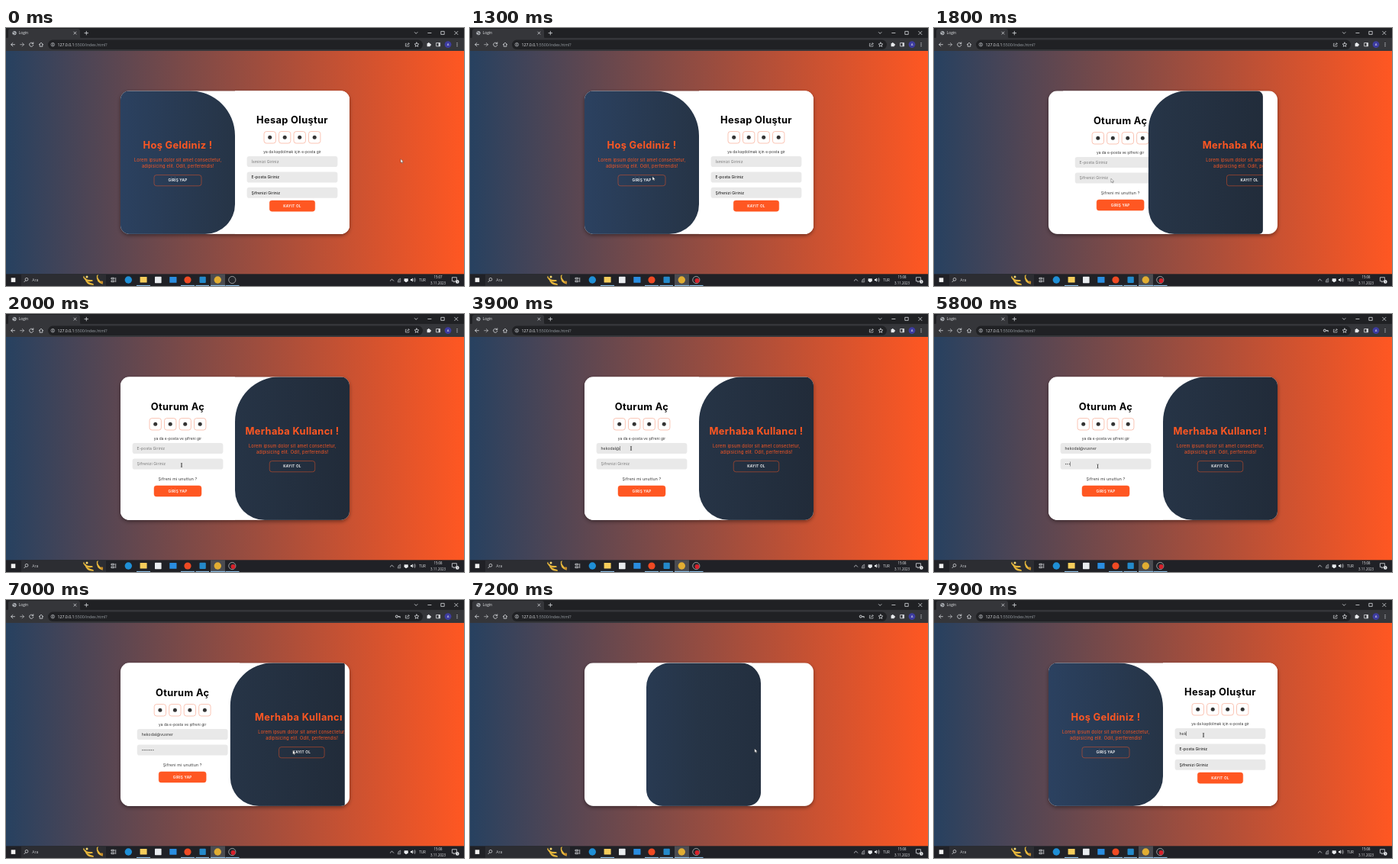
An HTML page for the animation above (8000 ms loop, 600 by 338 pixels).

```html
<!DOCTYPE html>
<html lang="tr">
<head>
<meta charset="utf-8">
<title>Login</title>
<style>
  html, body { margin: 0; width: 100%; height: 100%; overflow: hidden; background: #202124; }
  svg { display: block; width: 100vw; height: 100vh; }
  text { font-family: Inter, sans-serif; }
  .ui { font-family: "Open Sans", "Noto Sans", sans-serif; fill: #e8eaed; }
  .mid { text-anchor: middle; }
  .title { font-size: 12.8px; font-weight: 700; letter-spacing: .36px; }
  .lead { font-size: 5.6px; letter-spacing: .22px; }
  .note { font-size: 4.8px; letter-spacing: .06px; fill: #333; }
  .link { font-size: 5.2px; letter-spacing: .18px; fill: #333; }
  .field { font-size: 5.1px; letter-spacing: .08px; }
  .btn { font-size: 4.7px; font-weight: 600; letter-spacing: .23px; fill: #fff; }
  .line { fill: none; stroke: #dadce0; stroke-width: .8; stroke-linecap: round; stroke-linejoin: round; }
</style>
</head>
<body>
<svg id="stage" viewBox="0 0 600 338" preserveAspectRatio="none"></svg>
<script>
const LOOP = 8000;
const ORANGE = '#ff5722';
const EMAIL = 'hekodal@vusner';
const NAME = 'hek';
const CARD = { x: 150, y: 82.3, w: 300, h: 187.6 };

// Markup helpers
const text = (x, y, cls, str, extra = '') => `<text x="${x}" y="${y}" class="${cls}" ${extra}>${str}</text>`;
const rect = (x, y, w, h, fill, r = 0, extra = '') =>
  `<rect x="${x}" y="${y}" width="${w}" height="${h}" rx="${r}" fill="${fill}" ${extra}/>`;
const dot = (x, y, r, fill, extra = '') => `<circle cx="${x}" cy="${y}" r="${r}" fill="${fill}" ${extra}/>`;
const line = (d, extra = '') => `<path class="line" d="${d}" ${extra}/>`;
const gradient = (id, x1, x2, colors) =>
  `<linearGradient id="${id}" gradientUnits="userSpaceOnUse" x1="${x1}" x2="${x2}">` +
  colors.map((c, i) => `<stop offset="${i / (colors.length - 1)}" stop-color="${c}"/>`).join('') +
  '</linearGradient>';

const button = (cx, y, w, label, filled) =>
  rect(cx - w / 2, y, w, 14.2, filled ? ORANGE : 'none', 3.1, `stroke="${ORANGE}" stroke-width=".45"`) +
  text(cx, y + 8.8, 'btn mid', label);

const socials = (cx, cy) => [-29.3, -9.8, 9.7, 29.2].map(dx =>
  rect(cx + dx - 7.7, cy - 7.7, 15.4, 15.4, '#fff', 3.1, 'stroke="#f58a6a" stroke-width=".5"') +
  dot(cx + dx, cy, 2.5, '#333')).join('');

const input = (id, x, y, hint) =>
  rect(x, y, 118.8, 14, '#e9e9e9', 3.1) +
  text(x + 5.9, y + 8.9, 'field', hint, `id="${id}" data-hint="${hint}"`);

const panel = (id, title, button) =>
  `<g id="${id}" fill="${ORANGE}">` + text(225, 158.3, 'title mid', title) +
  text(225.3, 175, 'lead mid', 'Lorem ipsum dolor sit amet consectetur,') +
  text(225.3, 182.8, 'lead mid', 'adipisicing elit. Odit, perferendis!') + button + '</g>';

function defs() {
  return '<defs>' +
    gradient('page', 0, 600, ['#274160', '#ff5722']) +
    gradient('navy', 150, 450, ['#2b4160', '#263446', '#212b39']) +
    '<filter id="blur" x="-20%" y="-20%" width="140%" height="140%"><feGaussianBlur stdDeviation="2.9"/></filter>' +
    `<clipPath id="cardClip">${rect(CARD.x, CARD.y, CARD.w, CARD.h, '#000', 11.7)}</clipPath>` +
    '<clipPath id="toggleClip"><path id="toggleShape"/></clipPath></defs>';
}

function browserBar() {
  return rect(0, 0, 600, 13.5, '#202124') +
    '<path d="M1 13.5q2 0 2-2V4q0-3 3-3H94q3 0 3 3v7.500q0 2 2 2z" fill="#35363a"/>' +
    rect(0, 13, 600, 17, '#35363a') +
    dot(11, 6.6, 2.6, '#bdc1c6') + line('M9.300 5.600h2l1 1.500M10 8.200l1.500-.6', 'style="stroke:#35363a"') +
    text(16.800, 8.400, 'ui', 'Login', 'font-size="4.8"') +
    line('M88.900 5.100l3 3m0-3l-3 3M103 6.600h4.600m-2.300-2.300v4.600') +
    line('M535.400 5.600l1.800 1.800 1.800-1.800M552.800 6.500h4.200M570.200 4.400h4v4h-4zM587.700 4.400l4.200 4.200m0-4.200l-4.200 4.200') +
    line('M11.500 21.700h-4.800m2.200-2.200l-2.200 2.200 2.200 2.200') +
    line('M18.700 21.700h4.800m-2.200-2.200l2.200 2.200-2.200 2.200', 'opacity=".75"') +
    line('M35.500 20.400a2.600 2.600 0 1 0 .3 2M35.800 18.800v1.900h-1.900') +
    line('M43.300 21.700l2.700-2.500 2.700 2.500m-4.500-.4v2.900h3.600v-2.900') +
    rect(55, 15.6, 491, 12.4, '#202124', 6.2) +
    dot(61.300, 21.700, 2.3, 'none', 'stroke="#bdc1c6" stroke-width=".7"') + line('M61.300 21.500v1.300M61.300 20.400v.1') +
    text(67.500, 23.600, 'ui', '127.0.0.1<tspan fill="#9aa0a6">:5500/index.html?</tspan>', 'font-size="5.2"') +
    '<g id="key">' + dot(511.800, 21.600, 1.5, 'none', 'stroke="#dadce0" stroke-width="1"') +
    line('M513.500 21.600h2.800v1.400M515 21.600v1') + '</g>' +
    line('M524.400 20.300h-1v3.700h4.600v-1M525 22.500q.3-2 3-2m-1-1.200l1.200 1.200-1.200 1.200', 'opacity=".8"') +
    line('M538 19l.85 1.800 1.950.2-1.450 1.350.4 1.950-1.750-1-1.750 1 .4-1.950-1.450-1.350 1.950-.2z') +
    rect(551.600, 20, 4.200, 4.200, '#e8eaed', .5) + dot(553.700, 19.900, 1, '#e8eaed') + dot(556, 22.100, 1, '#e8eaed') +
    line('M564 19.500h4.600v4.400H564z') + rect(566.600, 19.500, 2, 4.400, '#dadce0') +
    dot(579, 21.600, 4.4, '#3d3ca0') + text(579, 23.200, 'ui mid', 'A', 'font-size="4.300"') +
    [19.700, 21.700, 23.700].map(y => dot(591, y, .6, '#dadce0')).join('');
}

function taskbar() {
  const running = [[171, 18], [229, 18], [248.500, 17.500], [268, 19], [287.500, 18]];
  const banana = (x, y, a) =>
    `<path d="M-6-3q1 6 11 5.500l1 1.500q-9 3-13-5z" fill="#e7b73c" transform="translate(${x} ${y}) rotate(${a})"/>`;
  return rect(0, 322.300, 600, 15.700, '#202126') + rect(20, 322.300, 111, 15.700, '#2c2d32') +
    rect(6.700, 327.300, 5.600, 5.600, '#f1f1f1') +
    dot(27, 329.300, 1.9, 'none', 'stroke="#e8eaed" stroke-width=".7"') + line('M25.600 330.800l-1.700 1.900') +
    text(34.300, 332.200, 'ui', 'Ara', 'font-size="5.200" opacity=".8"') +
    banana(108, 327.500, 0) + banana(110, 331.500, 12) + banana(124, 329, 35) +
    dot(106, 326, 1.500, '#f4d774') + dot(125.500, 333, 1.700, '#c98c2a') +
    line('M138.300 327.300h3.500v1.600h-3.500zM138.300 330.900h3.500v1.700h-3.500zM143.700 327.300v5.300') +
    rect(268, 322.300, 19, 15.700, '#4b4c51') +
    dot(160.300, 330, 4.700, '#1f8fd6') +
    rect(175.600, 326, 9, 7.600, '#f5cd5b', .6) +
    rect(195, 325.800, 8.600, 8.400, '#e9ecef', .6) +
    rect(214.300, 326, 9.200, 7.800, '#2a8de0', .6) +
    dot(238, 330, 4.600, '#ef4a23') +
    rect(253.500, 325.800, 8.300, 8.300, '#2489ca', 1) +
    dot(277.300, 330, 4.700, '#e1ad32') +
    dot(296.300, 330, 4.600, '#24262b', 'stroke="#c9c9c9" stroke-width=".7"') +
    dot(297.500, 331, 2.900, '#d8202a', 'id="rec"') +
    running.map(([x, w]) => rect(x, 336.900, w, 1.100, '#8dbfe6')).join('') +
    line('M503.300 331.200l2.200-2.200 2.200 2.200') +
    line('M513.200 332.500q0-3.500 3.500-4.500v4.500zM515 332.300v-2.500', 'opacity=".65"') +
    rect(521.600, 328.300, 5.200, 3.600, '#e8eaed', .4) + rect(523, 331.900, 2.400, 1, '#e8eaed') +
    '<path d="M530 329h1.200l1.700-1.500v5l-1.700-1.500H530z" fill="#e8eaed"/>' +
    line('M534.300 328.500q1 1.500 0 3M535.700 327.600q1.600 2.400 0 4.800', 'style="stroke-width:.6"') +
    text(545.600, 331.900, 'ui mid', 'TUR', 'font-size="4.600"') +
    text(566, 328.300, 'ui mid', '15:07', 'id="clock" font-size="4.400"') +
    text(566, 335.800, 'ui mid', '3.11.2023', 'font-size="4.400"') +
    line('M584.800 326.700h5.600v5h-2.200l-1.200 1.500v-1.500h-2.200z') + dot(591.300, 332.400, 2.300, '#e8eaed') +
    text(591.300, 333.800, 'mid', '1', 'font-size="3.600" fill="#222"');
}

function card() {
  const { x, y, w, h } = CARD;
  const signIn = '<g id="signIn">' + rect(x, y, 150, h, '#fff') +
    text(225, 125.700, 'title mid', 'Oturum Aç') + socials(225, 144.300) +
    text(225, 164.700, 'note mid', 'ya da e-posta ve şifreni gir') +
    input('email', 165.600, 169, 'E-posta Giriniz') + input('pass', 165.600, 189.500, 'Şifrenizi Giriniz') +
    text(225, 217.700, 'link mid', 'Şifreni mi unuttun ?') +
    button(225, 224.900, 62, 'GİRİŞ YAP', true) + '</g>';
  const signUp = '<g id="signUp">' + rect(x, y, 150, h, '#fff') +
    text(225, 124.600, 'title mid', 'Hesap Oluştur') + socials(225, 143.300) +
    text(225, 163.700, 'note mid', 'ya da kaydolmak için e-posta gir') +
    input('name', 165.600, 168, 'İsminizi Giriniz') + input('mail2', 165.600, 188.500, 'E-posta Giriniz') +
    input('pass2', 165.600, 208.800, 'Şifrenizi Giriniz') +
    button(225, 226, 59.500, 'KAYIT OL', true) + '</g>';
  return rect(x, y + 2, w, h, '#000', 11.700, 'opacity=".4" filter="url(#blur)"') +
    '<g clip-path="url(#cardClip)">' + rect(x, y, w, h, '#fff') +
    `<g id="forms">${signIn}${signUp}</g><rect id="caret" width=".45" height="6" fill="#222"/>` +
    '<g clip-path="url(#toggleClip)">' + rect(x, y, w, h, 'url(#navy)') +
    panel('leftPanel', 'Hoş Geldiniz !', button(225, 192.600, 62, 'GİRİŞ YAP')) +
    panel('rightPanel', 'Merhaba Kullancı !', button(225, 192.600, 59.500, 'KAYIT OL')) + '</g></g>';
}

const stage = document.getElementById('stage');
stage.innerHTML = defs() + rect(0, 29, 600, 294, 'url(#page)') + card() + browserBar() + taskbar() +
  '<path id="arrow" d="M0 0v5l1.200-1 .8 1.800.9-.4-.8-1.700h1.600z" fill="#fff" stroke="#222" stroke-width=".35"/>' +
  '<path id="beam" d="M-1.100-2.600q1.100 0 1.100.6v4q0 .6-1.100.6M1.100-2.600q-1.100 0-1.100.6v4q0 .6 1.100.6" fill="none" stroke="#222" stroke-width=".55"/>';
const $ = id => document.getElementById(id);

// Timing
const SLIDE = 600, TO_SIGN_IN = 1350, TO_SIGN_UP = 6915;
const keys = (start, n, step = 110) => Array.from({ length: n }, (_, i) => start + i * step);
const typing = {
  email: { from: 2500, to: 5250, str: EMAIL, at: [...keys(2800, 7), 3870, ...keys(4130, 6)] },
  pass: { from: 5250, to: TO_SIGN_UP, str: '•'.repeat(7), at: keys(5560, 7) },
  name: { from: 7580, to: LOOP, str: NAME, at: keys(7660, 3) }
};
const path = [
  [0, 517, 171.600], [300, 517, 171.600], [1150, 239, 194.500], [1450, 239, 194.500],
  [1950, 230, 198], [2150, 230, 198], [2500, 211, 176], [4800, 211, 176],
  [5200, 214.500, 199.500], [6300, 214.500, 199.500], [6800, 375.700, 197.300],
  [7100, 375.700, 197.300], [7550, 353, 177], [LOOP, 353, 177]
];

const clamp = v => Math.min(1, Math.max(0, v));
const smooth = p => p * p * (3 - 2 * p);

// CSS ease-in-out: cubic-bezier(.42, 0, .58, 1)
function easeInOut(p) {
  let lo = 0, hi = 1;
  for (let i = 0; i < 24; i++) {
    const s = (lo + hi) / 2, q = 1 - s;
    if (1.26 * s * q * q + 1.74 * s * s * q + s * s * s < p) lo = s; else hi = s;
  }
  return smooth(lo);
}

function pointer(t) {
  const i = Math.max(1, path.findIndex(p => p[0] > t));
  const [t0, x0, y0] = path[i - 1], [t1, x1, y1] = path[i];
  const p = smooth(clamp((t - t0) / (t1 - t0)));
  return [x0 + (x1 - x0) * p, y0 + (y1 - y0) * p];
}

function overInput(x, y, active) {
  const left = active < .5 ? 165.600 : 315.600;
  const tops = active < .5 ? [169, 189.500] : [168, 188.500, 208.800];
  return (active === 0 || active === 1) && x > left && x < left + 118.800 && tops.some(top => y > top && y < top + 14);
}

const shift = (id, x, y = 0) => $(id).setAttribute('transform', `translate(${x} ${y})`);
const show = (id, on) => $(id).setAttribute('visibility', on ? 'visible' : 'hidden');

function drawFields(t) {
  let caretOn = false;
  for (const [id, f] of Object.entries(typing)) {
    const n = f.at.filter(k => k <= t).length;
    const el = $(id);
    const value = n ? f.str.slice(0, n) : el.dataset.hint;
    if (el.textContent !== value) el.textContent = value;
    el.style.fill = n ? '#333' : '#777';
    el.style.fontSize = id === 'pass' && n ? '4px' : '';
    if (t < f.from || t >= f.to) continue;
    const last = n ? f.at[n - 1] : f.from;
    caretOn = (t - last) % 1000 < 500;
    const dx = id === 'name' ? 150 : 0;
    $('caret').setAttribute('x', +el.getAttribute('x') + dx + (n ? el.getComputedTextLength() : 0));
    $('caret').setAttribute('y', +el.getAttribute('y') - 4.900);
  }
  show('caret', caretOn);
}

function drawCard(t) {
  const out = clamp((t - TO_SIGN_IN) / SLIDE), back = clamp((t - TO_SIGN_UP) / SLIDE);
  const eased = easeInOut(out);
  const a = out < 1 ? (out > 0 ? 1 - eased : 1) : back === 1 ? 1 : back > 0 ? easeInOut(back) : 0;

  shift('forms', 150 * a);
  // Leaving, the sign-up form fades until it drops behind; returning, it pops in halfway.
  const fade = out < 1 ? (eased < .625 ? 1 - eased : 0) : back >= .5 ? 1 : 0;
  $('signUp').setAttribute('opacity', fade);

  const { x, y, w, h } = CARD, l = x + 150 * (1 - a), r = l + 150, b = y + h;
  const tl = 58.600 * (1 - a), bl = 39 * (1 - a), tr = 58.600 * a, br = 39 * a;
  const arc = (rad, dx, dy) => `a${rad} ${rad} 0 0 1 ${dx} ${dy}`;
  $('toggleShape').setAttribute('d', `M${l} ${y + tl}${arc(tl, tl, -tl)}H${r - tr}${arc(tr, tr, tr)}` +
    `V${b - br}${arc(br, -br, br)}H${l + bl}${arc(bl, -bl, -bl)}z`);
  shift('leftPanel', -w * (1 - a));
  shift('rightPanel', 150 + w * a);
  return a;
}

function render(t) {
  const active = drawCard(t);
  drawFields(t);
  const [x, y] = pointer(t), beam = overInput(x, y, active);
  show('beam', beam);
  show('arrow', !beam);
  shift(beam ? 'beam' : 'arrow', x, y);
  show('key', t >= 5580 && t < 7550);
  show('rec', t >= 100);
  $('clock').textContent = t < 500 ? '15:07' : '15:08';
}

const start = performance.now();
function tick() {
  render((performance.now() - start) % LOOP);
  requestAnimationFrame(tick);
}
tick();
</script>
</body>
</html>
```
